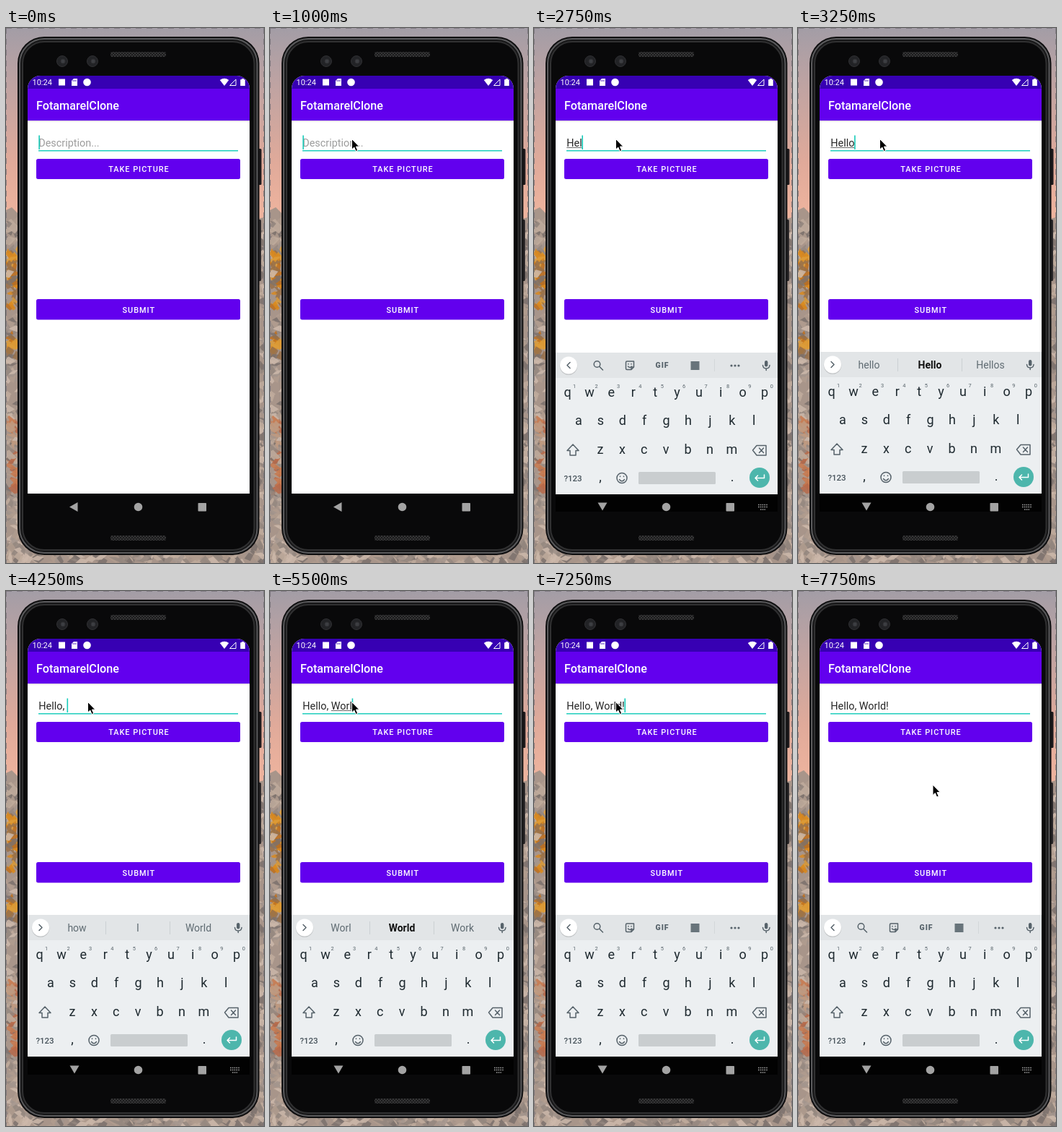
These frames come from a looping animation (358 px wide and 740 px high, 8000 ms). An HTML page:

```html
<!DOCTYPE html>
<html lang="en">
<head>
<meta charset="utf-8">
<title>Phone form</title>
<style>
  html, body { margin: 0; width: 100%; height: 100%; overflow: hidden; background: #111; }
  svg { display: block; font-family: Roboto, sans-serif; }
  text { white-space: pre; }
  .mid { text-anchor: middle; }
  .button { fill: #fff; font-size: 10.9px; font-weight: 500; letter-spacing: .97px; }
  .key { fill: #1f2a30; font-size: 18px; }
  .digit { fill: #566269; font-size: 7.4px; }
  .word { fill: #5f6b72; font-size: 14px; }
  .line { fill: none; stroke: #56626a; stroke-width: 1.5; stroke-linejoin: round; stroke-linecap: round; }
  .field { font-size: 14.4px; }
</style>
</head>
<body>
<svg width="358" height="740" viewBox="0 0 358 740">
  <defs>
    <linearGradient id="sky" x2="0" y2="1">
      <stop offset="0" stop-color="#a39da6"/>
      <stop offset=".3" stop-color="#bfa3a2"/>
      <stop offset=".7" stop-color="#e0aa9a"/>
      <stop offset="1" stop-color="#efb49e"/>
    </linearGradient>
    <linearGradient id="shade" x2="0" y2="1">
      <stop offset="0" stop-opacity=".14"/>
      <stop offset="1" stop-opacity="0"/>
    </linearGradient>
    <pattern id="mesh" width="4" height="4" patternUnits="userSpaceOnUse">
      <rect width="4" height="4" fill="#1b1b1c"/>
      <rect width="2" height="2" fill="#363637"/>
      <rect x="2" y="2" width="2" height="2" fill="#363637"/>
    </pattern>
    <clipPath id="screen"><path d="M30 645V84a18 18 0 0 1 18-18H320a18 18 0 0 1 18 18V645Z"/></clipPath>
  </defs>

  <rect width="358" height="265" fill="url(#sky)"/>
  <path d="M0 252L8 248L16 256L340 266L358 262V740H0Z" fill="#a8958a"/>
  <g id="rocks"></g>
  <path d="M0 .5H358M.5 0V740M357.5 0V740" fill="none" stroke="#77727a" stroke-dasharray="8 7" opacity=".75"/>

  <!-- phone body -->
  <rect x="349" y="167" width="5.5" height="50" rx="1.5" fill="#1d1a1c"/>
  <rect x="349" y="265" width="5" height="85" rx="1.5" fill="#2b282a"/>
  <rect x="16" y="12" width="335.500" height="717" rx="37" fill="#0e0e0f"/>
  <rect x="19" y="15" width="329.500" height="711" rx="34" fill="#161617" stroke="#5a5a5c" stroke-width="2"/>
  <rect x="23" y="19" width="321.500" height="703" rx="30" fill="#09090a" stroke="#303031" stroke-width="2"/>
  <rect x="145" y="33" width="77" height="7" rx="2" fill="url(#mesh)"/>
  <rect x="145" y="702" width="77" height="7" rx="2" fill="url(#mesh)"/>
  <g stroke="#303033">
    <circle cx="78" cy="46" r="7.5" fill="#222326"/><circle cx="120" cy="46" r="7.5" fill="#222326"/>
    <circle cx="79" cy="46" r="3" fill="#3c3e42"/><circle cx="121" cy="46" r="3" fill="#3c3e42"/>
  </g>
  <rect id="navShade" x="30" y="644" width="308" height="25" fill="#020202"/>

  <g clip-path="url(#screen)">
    <rect x="30" y="66" width="308" height="578" fill="#fff"/>
    <rect x="30" y="66" width="308" height="18" fill="#3700b3"/>
    <rect x="30" y="84" width="308" height="44" fill="#6200ee"/>
    <rect x="30" y="128" width="308" height="2.500" fill="url(#shade)"/>
    <g fill="#fff">
      <text x="36.500" y="79" font-size="11">10:24</text>
      <rect x="73" y="70.500" width="9" height="9"/>
      <path d="M94 70H99V80H91V73Z"/>
      <circle cx="112.500" cy="75" r="5.300"/>
      <path d="M296.800 72Q303 67.500 309.200 72L303 80Z"/>
      <path d="M319 71V79.500H310.500Z" fill="none" stroke="#fff"/>
      <path d="M325.200 71.200H327V70H330V71.200H331.800V80H325.200Z"/>
      <text x="42" y="112.500" font-size="16.2" font-weight="500">FotamarelClone</text>
    </g>
    <path d="M93 72V74M95 72V74M97 72V74" stroke="#3700b3" stroke-width=".8"/>

    <text id="hint" class="field" x="45.300" y="163.700" fill="#9c9c9c">Description...</text>
    <text id="typed" class="field" x="45.300" y="163.700" fill="#272727"></text>
    <rect id="under" y="165" height="1" fill="#6a6a6a"/>
    <rect x="45" y="169" width="277" height="1.500" fill="#1fcebd"/>
    <rect id="caret" y="148.500" width="1.600" height="19.500" fill="#16cbb9"/>

    <rect x="42" y="181" width="283" height="28" rx="2.500" fill="#6200ee"/>
    <rect x="42" y="375" width="283" height="28.500" rx="2.500" fill="#6200ee"/>
    <text class="button mid" x="184.500" y="199.200">TAKE PICTURE</text>
    <text class="button mid" x="184.300" y="393.500">SUBMIT</text>

    <g id="keyboard">
      <rect x="30" y="448" width="308" height="196" fill="#eceff1"/>
      <rect x="30" y="448" width="308" height="35" fill="#e2e5e7"/>
      <circle cx="48" cy="466.500" r="12.300" fill="#000" opacity=".14"/>
      <circle cx="48" cy="465.500" r="12" fill="#fff"/>
      <path id="chevron" class="line"/>
      <g id="tools">
        <circle class="line" cx="87.500" cy="464" r="4.300"/>
        <path class="line" d="M91 467.500L95.500 472"/>
        <path class="line" d="M129 460H138.500V468L135 471.500H129Q127.500 471.500 127.500 470V461.500Q127.500 460 129 460ZM138.500 468H135V471.500M130.500 467Q133 470 135.500 467M131 463.500V464M135 463.500V464"/>
        <text class="mid" x="178" y="469.300" font-size="10.500" font-weight="900" letter-spacing=".9" fill="#56626a">GIF</text>
        <rect x="217.500" y="460" width="12" height="12" fill="#68747b"/>
        <path d="M250.500 457V474" stroke="#d3d7d9"/>
        <g fill="#56626a"><circle cx="274" cy="466" r="1.600"/><circle cx="279" cy="466" r="1.600"/><circle cx="284" cy="466" r="1.600"/></g>
      </g>
      <g id="words">
        <path d="M138.500 457V475M227.500 457V475" stroke="#cbd0d3"/>
        <text class="word mid" x="98.500" y="471"></text>
        <text class="word mid" x="183" y="471"></text>
        <text class="word mid" x="267" y="471"></text>
      </g>
      <rect x="320" y="459" width="4.400" height="8.500" rx="2.200" fill="#56626a"/>
      <path class="line" d="M317.500 465.500Q318 470 322.200 470Q326.500 470 327 465.500M322.200 470V472.500"/>
      <g id="keys"></g>
      <path class="line" d="M54 575L62 583.500H58V590H50V583.500H46Z"/>
      <path class="line" d="M303.500 583L309 576.500H322V590H309ZM312.500 580L318.500 586.500M318.500 580L312.500 586.500"/>
      <text class="mid" x="54" y="625.500" font-size="11.500" font-weight="500" fill="#46525a">?123</text>
      <circle class="line" cx="122" cy="621.500" r="7"/>
      <path class="line" d="M118.500 623.500Q122 628 125.500 623.500M119.500 619V619.500M124.500 619V619.500"/>
      <rect x="145" y="613" width="107" height="17" rx="1.500" fill="#c9cdcf"/>
      <circle cx="313" cy="621" r="14" fill="#4db6ac"/>
      <path class="line" d="M319.500 617V621.500H307M310.500 618L307 621.500L310.500 625" style="stroke:#fff"/>
    </g>
  </g>

  <!-- navigation bar -->
  <g fill="#a3a3a3">
    <path id="back"/>
    <circle cx="183.500" cy="662.500" r="5.800"/>
    <rect x="266.500" y="657" width="11.500" height="11.500" rx=".8"/>
    <path id="kbIcon" d="M311 659.500H324M311 662.500H324M314 666H321" fill="none" stroke="#a3a3a3" stroke-width="1.600" stroke-dasharray="1.600 1.200"/>
  </g>
  <path id="mouse" d="M0 0V14.500L3.300 11.500L5.600 17L8.200 15.900L5.900 10.600H10.300Z" fill="#000" stroke="#fff" stroke-width="1" stroke-linejoin="round"/>
</svg>
<script>
const $ = id => document.getElementById(id);
const show = (id, on) => { $(id).style.display = on ? '' : 'none'; };

// Rock face: seeded shards along the visible edges
let seed = 11;
const rnd = () => (seed = seed * 16807 % 2147483647) / 2147483647;
const stone = ['#94877f', '#c0ab9c', '#b09c8e', '#cdb9aa', '#a3958d', '#7b716c'];
const warm = ['#d98a1f', '#c0701c', '#dc9c3a', '#96704a'];
const rust = ['#c87a50', '#c09a80', '#b5694a'];
const pick = list => list[Math.floor(rnd() * list.length)];
function shard(x, y) {
  const w = 3 + rnd() * 8, h = 2 + rnd() * 7, tilt = rnd() * 8 - 4;
  const leafy = x < 30 && (y > 300 && y < 390 || y > 425 && y < 455);
  const rusty = x < 30 && y > 540 && y < 650;
  const list = leafy && rnd() < .75 ? warm : rusty && rnd() < .5 ? rust : stone;
  return `<path d="M${x - w} ${y + tilt}L${x} ${y - h}L${x + w} ${y - tilt}L${x + 2} ${y + h}Z" fill="${pick(list)}" opacity=".85"/>`;
}
let rocks = '';
for (let i = 0; i < 230; i++) rocks += shard(rnd() * 20, 262 + rnd() * 478);
for (let i = 0; i < 130; i++) rocks += shard(343 + rnd() * 15, 274 + rnd() * 466);
for (let i = 0; i < 130; i++) rocks += shard(rnd() * 358, 722 + rnd() * 18);
$('rocks').innerHTML = rocks;

// Keyboard letters: text, first centre, baseline
const rows = [['qwertyuiop', 46.5, 509], ['asdfghjkl', 62, 548], ['zxcvbnm', 92, 588]];
const label = (cls, x, y, s) => `<text class="${cls} mid" x="${x}" y="${y}">${s}</text>`;
$('keys').innerHTML = rows.map(([s, x0, y], row) => [...s].map((c, i) => {
  const x = x0 + i * 30.4;
  return label('key', x, y, c) + (row ? '' : label('digit', x + 9.7, 496.5, (i + 1) % 10));
}).join('')).join('') + label('key', 92, 626, ',') + label('key', 275, 626, '.');

// Each step changes only the listed parts of the state
const steps = [
  { t: 0, text: '', from: 0, to: 0, caret: 1, kb: 0, icon: 0, dy: 0, words: null, mouse: null },
  { t: 250, mouse: [239, 86] },
  { t: 500, mouse: [132, 128], caret: 0 },
  { t: 750, mouse: [112, 152] },
  { t: 1000, mouse: [113.5, 153.5], caret: 1 },
  { t: 1500, caret: 0 },
  { t: 2000, caret: 1 },
  { t: 2500, caret: 0, icon: 1 },
  { t: 2750, text: 'Hel', to: 3, caret: 1, kb: 1, dy: 1 },
  { t: 3000, text: 'Hello', to: 5, dy: 0 },
  { t: 3250, words: ['hello', 'Hello', 'Hellos'], bold: 1 },
  { t: 3500, caret: 0 },
  { t: 3750, text: 'Hello,', to: 0, caret: 1, words: ['how', 'I', 'World'], bold: 0 },
  { t: 4250, text: 'Hello, ' },
  { t: 4500, text: 'Hello, W', from: 7, to: 8, words: ['W', 'We', 'What'] },
  { t: 5000, caret: 0 },
  { t: 5250, text: 'Hello, Wo', to: 9, caret: 1, words: ['Wo', 'Would', 'Work'], bold: 1 },
  { t: 5500, text: 'Hello, Worl', to: 11, words: ['Worl', 'World', 'Work'] },
  { t: 5750, text: 'Hello, World', to: 12, words: ['world', 'World', 'Worlds'] },
  { t: 6250, text: 'Hello, World!', from: 0, to: 0, words: null },
  { t: 6750, caret: 0 },
  { t: 7250, caret: 1 },
  { t: 7500, mouse: [166, 230] },
  { t: 7750, mouse: [187, 268], caret: 0 }
];

const pen = document.createElement('canvas').getContext('2d');
pen.font = '14.4px Roboto, sans-serif';
const widthOf = s => pen.measureText(s).width;

function draw(s) {
  const left = 45.3, start = widthOf(s.text.slice(0, s.from));
  show('hint', !s.text);
  $('typed').textContent = s.text;
  show('under', s.to > s.from);
  $('under').setAttribute('x', left + start);
  $('under').setAttribute('width', widthOf(s.text.slice(0, s.to)) - start);
  show('caret', s.caret);
  $('caret').setAttribute('x', left + widthOf(s.text) - (s.text ? .3 : 0));
  show('keyboard', s.kb);
  $('keyboard').setAttribute('transform', `translate(0 ${s.dy})`);
  show('tools', !s.words);
  show('words', s.words);
  $('chevron').setAttribute('d', s.words ? 'M46 461.5L50 465.5L46 469.5' : 'M50 461.5L46 465.5L50 469.5');
  if (s.words) document.querySelectorAll('#words text').forEach((el, i) => {
    const strong = s.bold && i === 1;
    el.textContent = s.words[i];
    el.style.fontWeight = strong ? 700 : 400;
    el.style.fill = strong ? '#111' : '';
  });
  $('back').setAttribute('d', s.kb ? 'M88.5 656.5H101.5L95 667.5Z' : 'M99.5 656V669L88 662.5Z');
  show('kbIcon', s.icon);
  show('navShade', s.icon);
  show('mouse', s.mouse);
  if (s.mouse) $('mouse').setAttribute('transform', `translate(${s.mouse})`);
}

const LOOP = 8000, origin = performance.now();
let last = -1;
function tick() {
  const t = (performance.now() - origin) % LOOP;
  const past = steps.filter(s => s.t <= t);
  if (past.length !== last) {
    last = past.length;
    draw(Object.assign({}, ...past));
  }
  requestAnimationFrame(tick);
}
tick();
</script>
</body>
</html>
```
